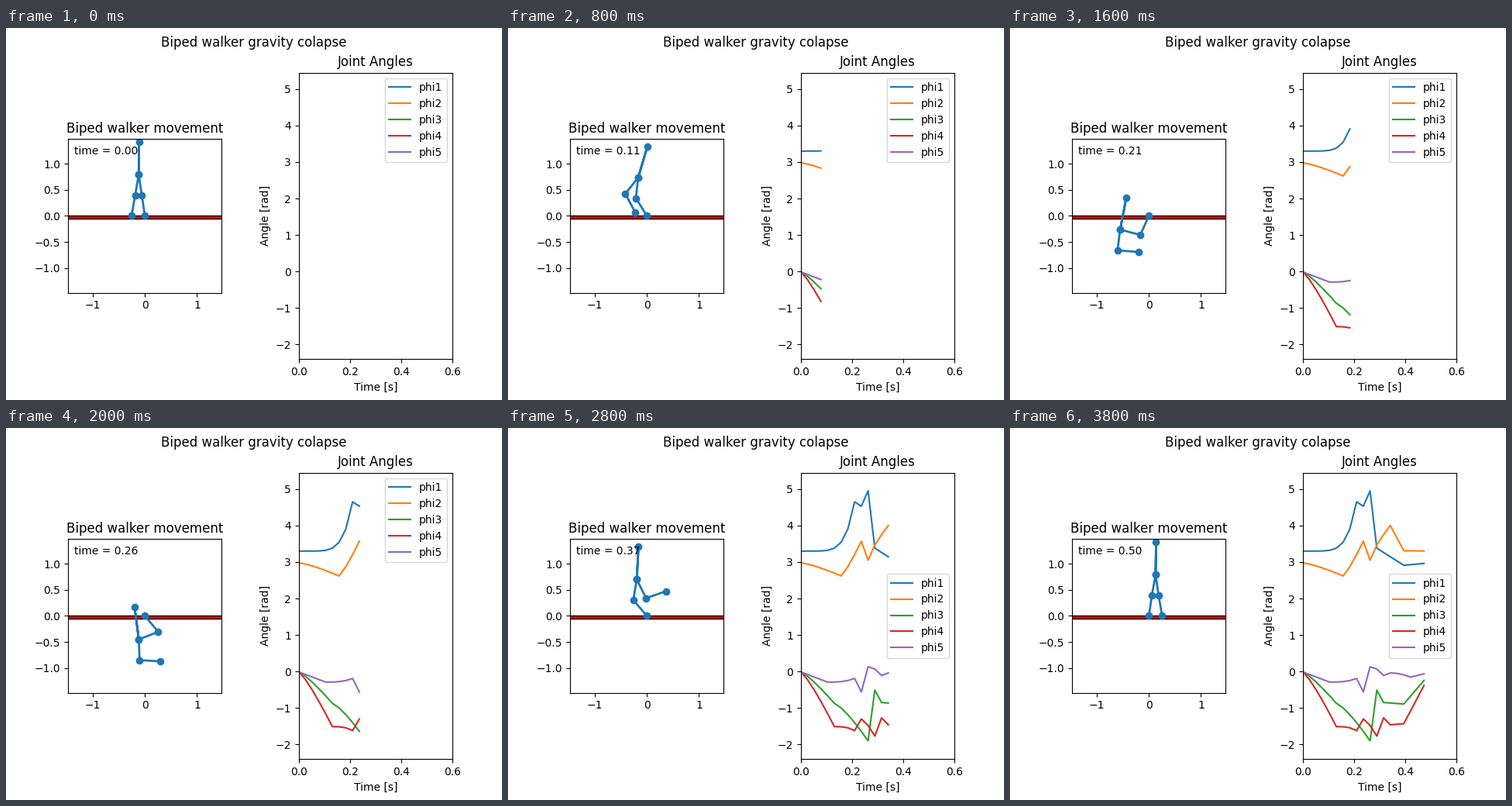
These frames come from a looping animation (640 by 480 pixels, 4 s). A matplotlib script:

```python
import numpy as np
import matplotlib.pyplot as plt
from matplotlib.animation import FuncAnimation
from matplotlib.patches import Rectangle

N = 20
LEG, TORSO = 0.4, 0.625
HALF = 2 * LEG + TORSO + 0.05
t = np.linspace(0, 0.5, N)


def track(start, *moves):
    """Angle at every step; each move is (end step, end angle, ease power)."""
    out = np.full(N, float(start))
    step, angle = 0, start
    for end, goal, *power in moves:
        u = np.linspace(0, 1, end - step + 1)
        out[step:end + 1] = angle + (goal - angle) * u ** (power[0] if power else 1)
        step, angle = end, goal
    return out


hip1 = track(3.3, (8, 4.65, 6), (9, 4.53), (10, 4.95), (11, 3.38),
             (15, 2.91), (19, 2.98))
hip2 = track(2.98, (6, 2.62, 1.3), (9, 3.57, 1.2), (10, 3.05),
             (13, 4.0, 0.75), (15, 3.31), (19, 3.3))
knee1 = track(0, (5, -0.87, 1.2), (10, -1.9, 1.3), (11, -0.51),
              (12, -0.85), (15, -0.89), (19, -0.03))
knee2 = track(0, (5, -1.51, 1.2), (8, -1.62, 3), (9, -1.3), (11, -1.77, 1.4),
              (12, -1.27), (13, -1.46), (15, -1.43), (19, -0.03))
lean = track(-0.01, (4, -0.29), (8, -0.19, 3), (9, -0.56), (10, 0.13),
             (12, -0.11, 2), (13, -0.04), (16, -0.155, 2), (19, -0.015))
angles = [hip1, hip2, knee1, knee2, lean]


def link(length, angle):
    return length * np.array([np.sin(angle), -np.cos(angle)])


def pose(k):
    """Joint positions from the stance foot, over the head, to the swing foot."""
    thigh1 = hip1[k] + lean[k]
    thigh2 = hip2[k] + lean[k] - np.pi
    foot = np.zeros(2)
    knee = foot + link(LEG, thigh1 - knee1[k])
    hip = knee + link(LEG, thigh1)
    head = hip + link(TORSO, np.pi + lean[k])
    swing_knee = hip + link(LEG, thigh2)
    swing_foot = swing_knee + link(LEG, thigh2 - knee2[k])
    return np.array([foot, knee, hip, head, hip, swing_knee, swing_foot]).T


fig, (ax, graph) = plt.subplots(1, 2, figsize=(6.4, 4.8), dpi=100)
fig.subplots_adjust(left=0.125, right=0.9, bottom=0.11, top=0.88, wspace=0.5)
fig.suptitle("Biped walker gravity colapse")

ax.set(title="Biped walker movement", xlim=(-HALF, HALF), ylim=(-HALF, HALF))
ax.set_aspect("equal", adjustable="box")
ax.add_patch(Rectangle((-5, -0.05), 10, 0.05, fc="red", ec="black"))
walker, = ax.plot([], [], "o-", lw=2)
clock = ax.text(0.04, 0.9, "", transform=ax.transAxes)

graph.set(title="Joint Angles", xlabel="Time [s]", ylabel="Angle [rad]",
          xlim=(0, 0.6), ylim=(-2.4, 5.45))
curves = [graph.plot([], [], label=f"phi{i + 1}")[0] for i in range(len(angles))]
legend = graph.legend(loc="upper right")


def update(k):
    walker.set_data(*pose(k))
    clock.set_text(f"time = {t[k]:.2f}")
    for curve, angle in zip(curves, angles):
        curve.set_data(t[:k], angle[:k])
    # The legend steps aside once the curves reach it
    legend.set_loc("upper right" if k < 14 else "center right")
    return [walker, clock, legend, *curves]


anim = FuncAnimation(fig, update, frames=N, interval=200, repeat=True,
                     repeat_delay=0, blit=False)
plt.show()
```
